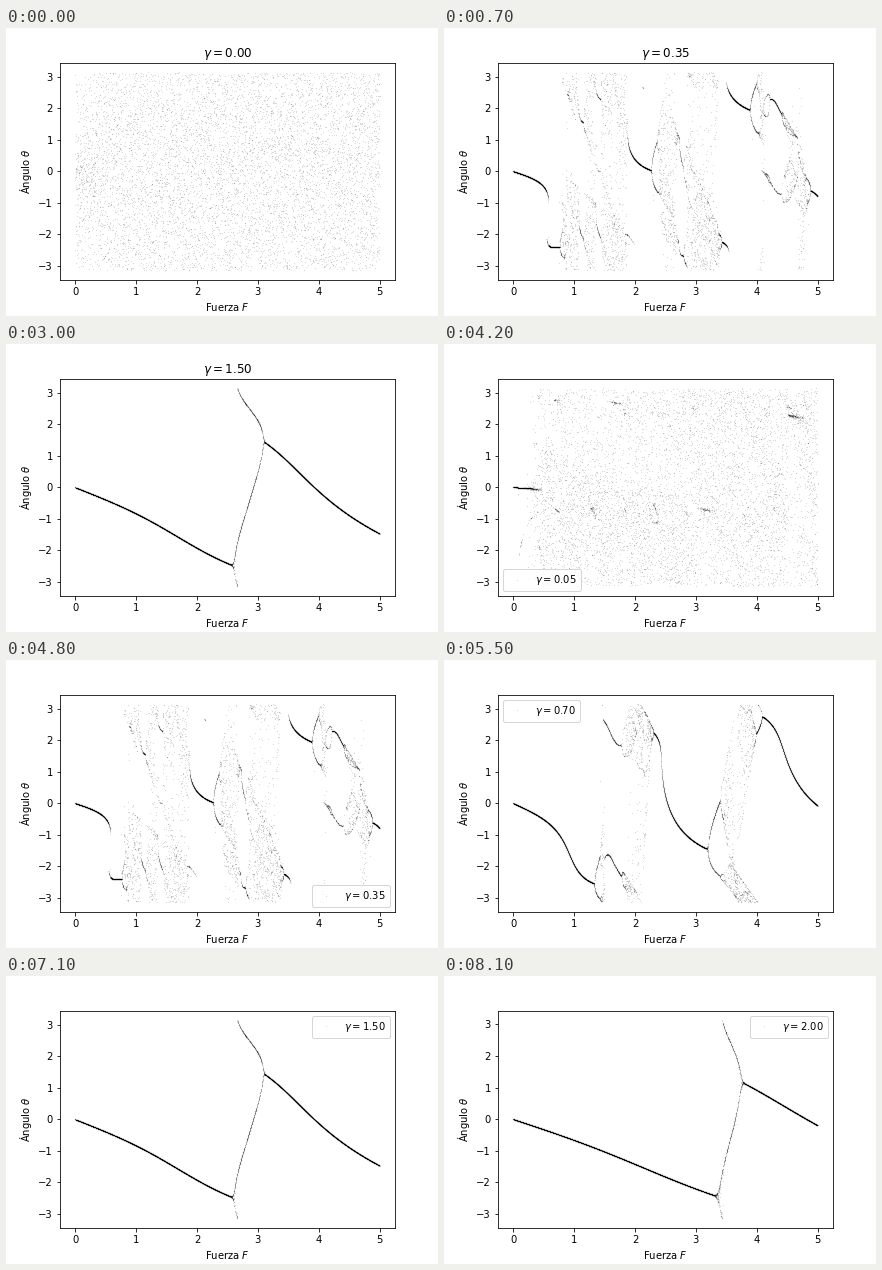
Write a matplotlib script that moves like this. It is 432 by 288 pixels and loops after 8.2 s.

```python
import math

import matplotlib.pyplot as plt
import numpy as np
from matplotlib.animation import FuncAnimation

OMEGA = 2 / 3            # drive frequency of the damped pendulum
POINTS = 7000
PERIODS = 30
STEPS = 64               # integration steps per drive period
GAMMAS = [0.05 * k for k in range(41)]

force = np.linspace(0, 5, POINTS, dtype=np.float32)
rng = np.random.default_rng(7)


def wrap(angle):
    return (angle + math.pi) % (2 * math.pi) - math.pi


def strobe(gamma):
    """Angle after many periods of x'' + gamma x' + sin x = F sin(OMEGA t)."""
    h = 2 * math.pi / OMEGA / STEPS
    decay = math.exp(-gamma * h)
    drift = (1 - decay) / gamma if gamma else h

    # The linear response to the drive is exact; only the rest is integrated.
    gain = 1 / (-OMEGA**2 + 1j * gamma * OMEGA)
    phases = np.exp(1j * OMEGA * h * np.arange(STEPS))
    response = (gain * phases).imag.tolist()

    start = rng.uniform(-math.pi, math.pi, POINTS).astype(np.float32)
    phi = start - force * response[0]
    speed = -force * (1j * OMEGA * gain).imag
    torque = np.empty_like(phi)

    for _ in range(PERIODS):
        for r in response:
            np.multiply(force, r, out=torque)
            torque += phi
            np.sin(torque, out=torque)
            torque *= h
            speed -= torque
            np.multiply(speed, drift, out=torque)
            phi += torque
            speed *= decay
        phi = wrap(phi)
    return wrap(phi + force * response[0])


angles = [strobe(gamma) for gamma in GAMMAS]

plt.rcParams["font.family"] = "DejaVu Sans"
fig, ax = plt.subplots(figsize=(6, 4), dpi=72)
fig.subplots_adjust(left=0.125, right=0.9, bottom=0.125, top=0.88)


def draw(frame):
    with_legend, k = divmod(frame, len(GAMMAS))
    label = rf"$\gamma = {GAMMAS[k]:.2f}$"
    ax.clear()
    ax.plot(force, angles[k], "k.", ms=0.1, label=label)
    ax.set_xlabel("Fuerza $F$")
    ax.set_ylabel(r"Ángulo $\theta$")
    if with_legend:
        ax.legend(loc="best")
    else:
        ax.set_title(label)


anim = FuncAnimation(fig, draw, frames=2 * len(GAMMAS), interval=100, repeat=True,
                     repeat_delay=0)
plt.show()
```
